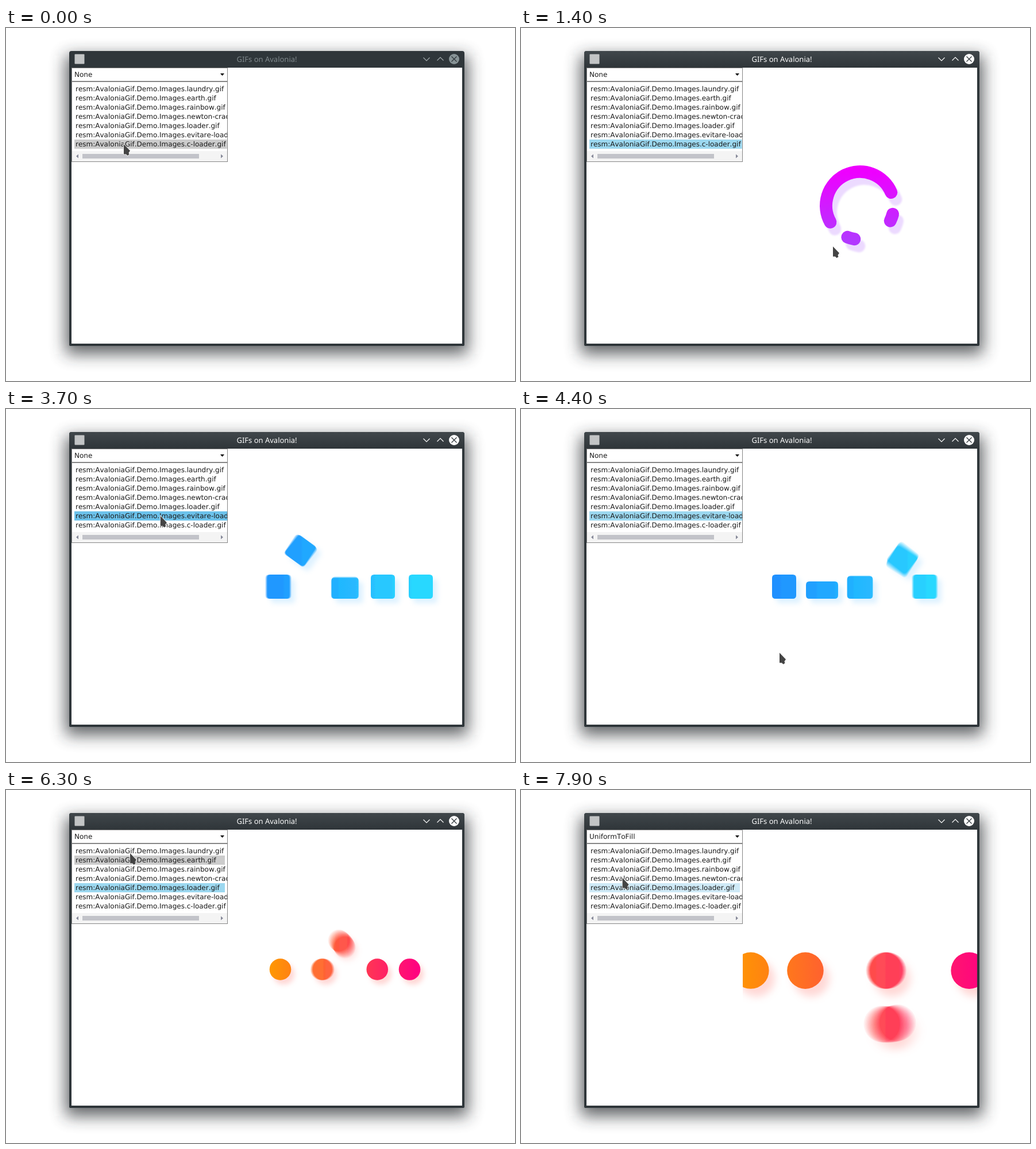
Write an HTML page that moves like this. It is 886 px wide and 614 px high and loops after 8 s.

```html
<!DOCTYPE html>
<html lang="en">
<head>
<meta charset="utf-8">
<title>GIFs on Avalonia!</title>
<style>
html, body { margin: 0; width: 100%; height: 100%; overflow: hidden; background: #fff; }
svg { display: block; }
text { white-space: pre; text-rendering: geometricPrecision; }
.ui { font: 12px "DejaVu Sans", sans-serif; font-kerning: none; font-variant-ligatures: none; fill: #1a1a1a; }
.title { font: 13px "Noto Sans", sans-serif; text-anchor: middle; }
.sum > * { mix-blend-mode: plus-lighter; }
</style>
</head>
<body>
<svg width="886" height="614" viewBox="0 0 886 614">
  <defs>
    <linearGradient id="bar" x1="0" y1="0" x2="0" y2="1">
      <stop stop-color="#40474b"/><stop offset="1" stop-color="#2f3539"/>
    </linearGradient>
    <linearGradient id="violet" gradientUnits="userSpaceOnUse" x1="0" y1="250" x2="0" y2="370">
      <stop stop-color="#ee00ff"/><stop offset="1" stop-color="#b238ff"/>
    </linearGradient>
    <linearGradient id="blue" gradientUnits="userSpaceOnUse" x1="450" y1="0" x2="715" y2="0">
      <stop stop-color="#1a90ff"/><stop offset="1" stop-color="#26d3ff"/>
    </linearGradient>
    <linearGradient id="fire" gradientUnits="userSpaceOnUse" x1="458" y1="0" x2="721" y2="0">
      <stop stop-color="#ff9800"/><stop offset="1" stop-color="#ff0082"/>
    </linearGradient>
    <filter id="soft" filterUnits="userSpaceOnUse" x="0" y="0" width="886" height="614">
      <feGaussianBlur stdDeviation="14"/>
    </filter>
    <filter id="violetShade" filterUnits="userSpaceOnUse" x="386" y="69" width="408" height="480" color-interpolation-filters="sRGB">
      <feDropShadow dx="8" dy="12" stdDeviation="1.6" flood-color="#ecdaff"/>
    </filter>
    <filter id="blueShade" filterUnits="userSpaceOnUse" x="386" y="69" width="408" height="480" color-interpolation-filters="sRGB">
      <feDropShadow dx="8" dy="8" stdDeviation="4.5" flood-color="#2aa8ff" flood-opacity=".15"/>
    </filter>
    <filter id="fireShade" filterUnits="userSpaceOnUse" x="386" y="69" width="408" height="480" color-interpolation-filters="sRGB">
      <feDropShadow dx="6" dy="8" stdDeviation="4" flood-color="#ff3a30" flood-opacity=".2"/>
    </filter>
    <clipPath id="view"><rect x="386" y="69" width="408" height="480"/></clipPath>
    <clipPath id="listClip"><rect x="115" y="94" width="270" height="138"/></clipPath>
  </defs>

  <rect width="886" height="614" fill="#fff"/>
  <rect x="104" y="48" width="700" height="519" fill="#2a2f30" opacity=".75" filter="url(#soft)"/>
  <path d="M110 551V44Q110 40 114 40H794Q798 40 798 44V551Q798 553 796 553H112Q110 553 110 551Z" fill="#2f363a"/>
  <path id="activeBar" d="M110 69V44Q110 40 114 40H794Q798 40 798 44V69Z" fill="url(#bar)"/>
  <rect x="114" y="69" width="680" height="480" fill="#fff"/>
  <rect x="119.500" y="45.500" width="17" height="17" rx="1" fill="#c2c4c5"/>
  <text class="title" id="title" x="454" y="59">GIFs on Avalonia!</text>
  <g id="buttons" fill="none" stroke-width="1.2">
    <path d="M726.500 51.500L732 57L737.500 51.500M750.500 56.500L756 51L761.500 56.500"/>
    <circle id="close" cx="780" cy="54" r="9" stroke="none"/>
    <path d="M775.500 49.500L784.500 58.500M784.500 49.500L775.500 58.500" stroke="#2f363a"/>
  </g>

  <g clip-path="url(#view)"><g id="image"></g></g>

  <rect id="combo" x="114.500" y="69.500" width="271" height="23" fill="#fff"/>
  <text class="ui" id="mode" x="119" y="85"></text>
  <path d="M373 79H380L376.500 83Z" fill="#000"/>
  <rect x="114.500" y="93.500" width="271" height="139" fill="#fff" stroke="#868686"/>
  <g id="list" clip-path="url(#listClip)"></g>
  <rect x="115" y="214" width="270" height="18" fill="#f4f4f4"/>
  <rect x="133" y="219" width="203" height="8" fill="#c2c3c9"/>
  <path d="M126 219.500V226.500L122 223ZM374 219.500V226.500L378 223Z" fill="#868999"/>
  <g id="drop">
    <rect x="114.500" y="93.500" width="271" height="73" fill="#fff" stroke="#868686"/>
    <g id="modes"></g>
  </g>
  <path id="cursor" d="M0 0V17.500H4L6.500 20L9.500 18L8.500 15L11 11.500Z" fill="#444" stroke="#fff" stroke-width="1.400" paint-order="stroke"/>
</svg>
<script>
const $ = id => document.getElementById(id);
const LOOP = 8000, CX = 590, CY = 309, RAD = Math.PI / 180, LAG = 140;
const files = ["laundry", "earth", "rainbow", "newton-cradle", "loader", "evitare-loader", "c-loader"];
const modes = ["None", "Fill", "Uniform", "UniformToFill"];

// Pointer stops: [time, x, y]
const stops = [[0, 205, 202], [700, 206, 203], [900, 257, 209], [1400, 543, 380], [2400, 477, 300],
  [2900, 293, 187], [3800, 268, 186], [4400, 450, 424], [4900, 401, 358], [5300, 344, 171],
  [5500, 340, 169], [6300, 216, 110], [6600, 188, 80], [7400, 172, 153], [LOOP, 177, 153]];

const clamp = (v, a, b) => Math.max(a, Math.min(b, v));
const mod = (a, n) => ((a % n) + n) % n;
const ease = u => u * u * (3 - 2 * u);
const bell = (v, a, b) => v > a && v < b ? Math.sin(Math.PI * (v - a) / (b - a)) : 0;

// The screen refreshes every 100 ms; later it stalls for part of every 400 ms.
function snap(t) {
  t = Math.floor(t / 100) * 100;
  if (t < 2900) return Math.min(t, 2400);
  if (t > 7200) return t;
  const r = (t - (t < 4300 ? 2900 : 4300)) % 400;
  return t - Math.max(0, r - 200);
}

function pointerAt(t) {
  const i = stops.findIndex(s => s[0] > t);
  const a = stops[i - 1], b = stops[i];
  const u = ease((t - a[0]) / (b[0] - a[0]));
  return [a[1] + (b[1] - a[1]) * u, a[2] + (b[2] - a[2]) * u];
}

// Motion blur: n copies that add up to full opacity; q runs from -0.5 to 0.5.
function smear(n, shape) {
  let s = "";
  for (let j = 0; j < n; j++) s += `<path opacity="${1 / n}" d="${shape(j / (n - 1) - 0.5)}"/>`;
  return s;
}

// Violet ring: a long turning arc, with beads crossing its gap.
function ring(t) {
  const dt = t - 1400, mid = 244 + dt * 443 / 1500;
  const pt = a => `${CX + 59 * Math.cos(a * RAD)} ${CY + 59 * Math.sin(a * RAD)}`;
  const arc = (a, b) => `M${pt(a)}A59 59 0 ${b - a > 180 ? 1 : 0} 1 ${pt(b)}`;
  let d = arc(mid - 93, mid + 93);
  for (let s = mod(dt * 290 / 1500 + 48, 82) - 90; s < 90; s += 82) {
    const a = mid + 180 + 1.07 * s - 2e-5 * s ** 3;
    d += arc(a - 6, a + 6);
  }
  return `<path d="${d}" fill="none" stroke="url(#violet)" stroke-width="22" stroke-linecap="round" filter="url(#violetShade)"/>`;
}

function tile(x, y, w, h, turn) {
  const c = Math.cos(turn * RAD), s = Math.sin(turn * RAD), a = w / 2, b = h / 2, r = 6;
  const p = (u, v) => `${x + u * c - v * s} ${y + u * s + v * c}`;
  return `M${p(r - a, -b)}L${p(a - r, -b)}Q${p(a, -b)} ${p(a, r - b)}L${p(a, b - r)}Q${p(a, b)} ${p(a - r, b)}` +
    `L${p(r - a, b)}Q${p(-a, b)} ${p(-a, b - r)}L${p(-a, r - b)}Q${p(-a, -b)} ${p(r - a, -b)}Z`;
}

// Blue tiles hop left one after another while one tile slides right below them.
function tiles(t) {
  const base = mod(205 - (t - 4400) * 0.4, 608) - 170;
  const pose = q => {
    const phase = base + 6 * q;
    let d = "";
    for (let i = 0; i < 4; i++) {
      const v = phase - 63 * (3 - i), turn = clamp(v, 0, 180), th = turn * RAD, sn = Math.sin(th);
      const flat = bell(v, -150, -20) + 0.8 * bell(v, 180, 235);
      const x = 458 + 66 * i + 33 * (1 - Math.cos(th)) + 3 * sn;
      const y = CY - 64 * Math.sin(th + 0.7 * Math.sin(2 * th) * sn * sn);
      d += tile(x, y + 6 * flat, 42 + 14 * flat, 42 - 12 * flat, turn);
    }
    const u = clamp(phase / 345, 0, 1);
    return d + tile(722 - 264 * (0.6 * u + 0.4 * ease(u)), CY, 42, 42, 0);
  };
  return `<g class="sum" fill="url(#blue)" filter="url(#blueShade)">${smear(8, pose)}</g>`;
}

// Balls swap places in turn: rightwards above the row, then back below it.
function balls(t, zoom) {
  const span = 275, y0 = 312, r = 18.8, slot = i => CX + 56.25 * (i - 2);
  const back = t >= 7400, dir = back ? -1 : 1;
  const at = (t - (back ? 7493 : 5833)) / span, k = Math.floor(at), u = at - k;
  const moving = k >= 0 && k < 4, pair = back ? 3 - k : k, mid = slot(pair + 0.5);
  const ball = (x, y) => `M${x - r} ${y}a${r} ${r} 0 1 1 ${2 * r} 0a${r} ${r} 0 1 1 ${-2 * r} 0Z`;
  let still = "";
  for (let i = 0; i < 5; i++) {
    if (!moving || (i !== pair && i !== pair + 1)) still += ball(slot(i), y0);
  }
  const swap = q => {
    const th = Math.PI * u + 0.38 * q, sn = Math.sin(th);
    return ball(mid - dir * Math.cos(th) * (28 + 15 * Math.max(0, sn)), y0 - dir * 55.5 * sn) +
      ball(mid + dir * (28 - 56 * u + 4.5 * q), y0);
  };
  return `<g transform="translate(${CX} ${CY}) scale(${zoom}) translate(${-CX} ${-CY})">` +
    `<g class="sum" fill="url(#fire)" filter="url(#fireShade)"><path d="${still}"/>${moving ? smear(12, swap) : ""}</g></g>`;
}

function addRows(group, names, x, top, pitch, rise) {
  group.innerHTML = names.map((name, i) =>
    `<rect x="${x}" y="${top + pitch * i}" width="270" height="${pitch}"/>` +
    `<text class="ui" x="${group.id === "list" ? 121 : 119}" y="${top + pitch * i + rise}">${name}</text>`).join("");
}

function paintRows(group, sel, hov, faded) {
  group.querySelectorAll("rect").forEach((row, i) => row.setAttribute("fill",
    i === sel ? (faded ? "#cfeaf7" : i === hov ? "#6cc2eb" : "#9cd8f0") : i === hov ? "#cccccc" : "none"));
}

function draw(t) {
  const active = t >= 100, filled = t >= 7800, open = t >= 6700 && !filled;
  const sel = t < 200 ? -1 : t < 3400 ? 6 : t < 5700 ? 5 : 4;
  const [hx, hy] = pointerAt(Math.max(0, t - LAG));
  const hov = t < 6500 && hx < 385 ? Math.floor((hy - 98) / 16) : -1;
  $("activeBar").style.opacity = active ? 1 : 0;
  $("title").setAttribute("fill", active ? "#fcfcfc" : "#7f888c");
  $("buttons").setAttribute("stroke", active ? "#fcfcfc" : "#a1a9ac");
  $("close").setAttribute("fill", active ? "#fcfcfc" : "#879396");
  $("combo").setAttribute("stroke", hy < 94 ? "#444" : "#868686");
  $("mode").textContent = modes[filled ? 3 : 0];
  $("image").innerHTML = sel === 6 ? ring(t) : sel === 5 ? tiles(t) : sel === 4 ? balls(t, filled ? 1.69 : 1) : "";
  paintRows($("list"), sel, hov, filled);
  $("drop").style.display = open ? "" : "none";
  paintRows($("modes"), 0, Math.max(0, Math.floor((hy - 94) / 18)), false);
  $("cursor").setAttribute("transform", `translate(${pointerAt(t)})`);
}

addRows($("list"), files.map(name => `resm:AvaloniaGif.Demo.Images.${name}.gif`), 119, 98, 16, 12);
addRows($("modes"), modes, 115, 94, 18, 13);
$("list").querySelectorAll("text").forEach(label => label.previousElementSibling
  .setAttribute("width", Math.max(262, label.getComputedTextLength() + 4)));

let shown = -1;
function tick() {
  const t = snap(performance.now() % LOOP);
  if (t !== shown) draw(shown = t);
  requestAnimationFrame(tick);
}
tick();
</script>
</body>
</html>
```
